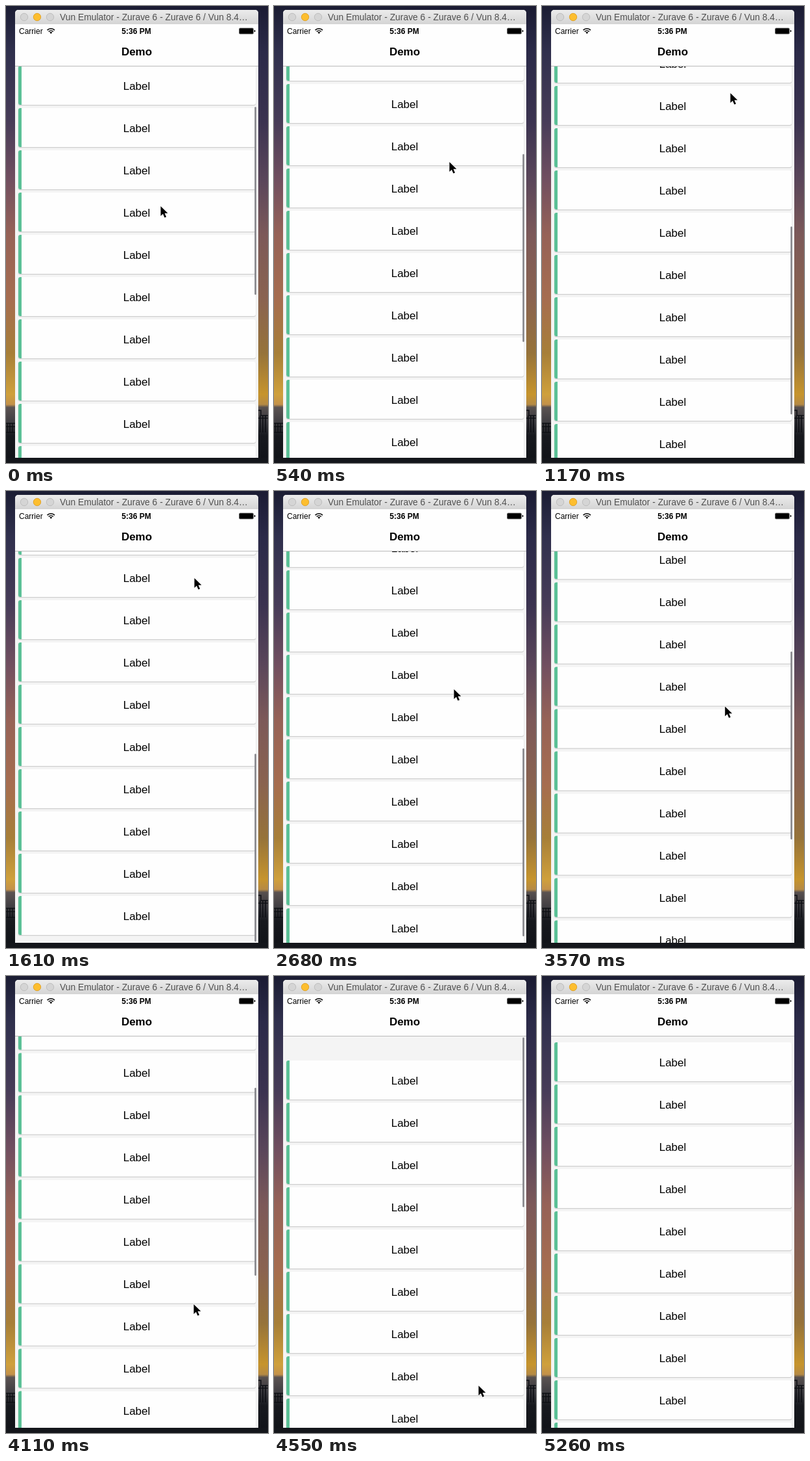
An HTML page for the animation above (6.07 s loop, 404x703 px).

```html
<!DOCTYPE html>
<html lang="en">
<head>
<meta charset="utf-8">
<title>List scrolling demo</title>
<style>
  html, body { margin: 0; width: 100%; height: 100%; overflow: hidden; background: #16171d; }
  svg { display: block; width: 100vw; height: 100vh; }
  text { font-family: "Liberation Sans", Arial, Helvetica, sans-serif; }
</style>
</head>
<body>
<svg viewBox="0 0 404 703" xmlns="http://www.w3.org/2000/svg">
  <defs>
    <linearGradient id="skyLeft" x1="0" y1="0" x2="0" y2="1">
      <stop offset="0" stop-color="#1b1d33"/>
      <stop offset=".1" stop-color="#30304d"/>
      <stop offset=".25" stop-color="#473c58"/>
      <stop offset=".38" stop-color="#714f60"/>
      <stop offset=".5" stop-color="#966257"/>
      <stop offset=".64" stop-color="#a66d50"/>
      <stop offset=".76" stop-color="#a77f38"/>
      <stop offset=".85" stop-color="#cfa03c"/>
      <stop offset=".872" stop-color="#c3914b"/>
      <stop offset=".878" stop-color="#5b5352"/>
      <stop offset=".91" stop-color="#413f43"/>
      <stop offset=".94" stop-color="#17191e"/>
      <stop offset="1" stop-color="#111318"/>
    </linearGradient>
    <linearGradient id="skyRight" x1="0" y1="0" x2="0" y2="1">
      <stop offset="0" stop-color="#1b1c33"/>
      <stop offset=".1" stop-color="#2b2a48"/>
      <stop offset=".25" stop-color="#3b3350"/>
      <stop offset=".38" stop-color="#5a465a"/>
      <stop offset=".5" stop-color="#7c5959"/>
      <stop offset=".64" stop-color="#8a6350"/>
      <stop offset=".76" stop-color="#96733a"/>
      <stop offset=".85" stop-color="#c6942d"/>
      <stop offset=".872" stop-color="#b58a45"/>
      <stop offset=".878" stop-color="#57504f"/>
      <stop offset=".91" stop-color="#38383d"/>
      <stop offset=".94" stop-color="#17191e"/>
      <stop offset="1" stop-color="#111318"/>
    </linearGradient>
    <linearGradient id="bar" x1="0" y1="0" x2="0" y2="1">
      <stop offset="0" stop-color="#ececec"/>
      <stop offset="1" stop-color="#d4d4d4"/>
    </linearGradient>
    <clipPath id="view"><rect x="14" y="93" width="375" height="602"/></clipPath>
    <g id="row">
      <rect x="18.5" y=".3" width="367" height="61.2" rx="3.5" fill="#e3e3e3"/>
      <rect x="19" y="1" width="366" height="60" rx="3" fill="#cfcfcf"/>
      <rect x="19" width="366" height="60" rx="3" fill="#fefefe"/>
      <path d="M24 0H22a3 3 0 0 0-3 3v54a3 3 0 0 0 3 3h2z" fill="#5bc096"/>
      <text x="201.5" y="36.6" font-size="17" text-anchor="middle">Label</text>
    </g>
  </defs>

  <rect width="202" height="703" fill="url(#skyLeft)"/>
  <rect x="202" width="202" height="703" fill="url(#skyRight)"/>
  <rect y="695" width="404" height="8" fill="#14161b"/>
  <path d="M0 642H14M0 647H14M2 642V656M6 642V656M10 642V656M0 656H14" stroke="#0e1014" stroke-width="1.3"/>
  <path d="M389 622l4 0v8h11M389 634H404M392 630V656M396 630V656M400 630V656" fill="none" stroke="#0e1014" stroke-width="1.6"/>

  <path d="M14 695V11a5 5 0 0 1 5-5H384a5 5 0 0 1 5 5V695z" fill="#f4f4f4"/>
  <g clip-path="url(#view)">
    <g id="list"></g>
    <rect id="thumb" x="383.3" width="2.6" rx="1.3" fill="#85858a"/>
  </g>

  <path d="M14 28V11a5 5 0 0 1 5-5H384a5 5 0 0 1 5 5V28z" fill="url(#bar)"/>
  <g stroke-width="1">
    <circle cx="28" cy="17" r="5.7" fill="#d5d5d5" stroke="#bebebe"/>
    <circle cx="48" cy="17" r="5.7" fill="#fdbe2f" stroke="#e0a42b"/>
    <circle cx="68" cy="17" r="5.7" fill="#d5d5d5" stroke="#bebebe"/>
  </g>
  <text x="83" y="22" font-size="13.85" fill="#505050">Vun Emulator - Zurave 6 - Zurave 6 / Vun 8.4…</text>

  <rect x="14" y="28" width="375" height="64" fill="#fefefe"/>
  <rect x="14" y="92" width="375" height="1" fill="#b9b9b9"/>
  <text x="20" y="42.6" font-size="12">Carrier</text>
  <g fill="none" stroke="#000" stroke-width="1.6">
    <path d="M63.6 37.1a8 8 0 0 1 11.4 0M65.8 39.4a5 5 0 0 1 7 0"/>
    <path d="M69.3 42.8l-2-2a2.9 2.9 0 0 1 4 0z" fill="#000" stroke="none"/>
  </g>
  <text x="201" y="42.6" font-size="12" font-weight="700" text-anchor="middle">5:36 PM</text>
  <rect x="359.5" y="34" width="22" height="9" rx="1.5" fill="#000" stroke="#777" stroke-width=".8"/>
  <path d="M382.7 36.7a1.8 1.8 0 0 1 0 3.6z"/>
  <text x="201.5" y="76" font-size="17" font-weight="700" text-anchor="middle">Demo</text>

  <path id="pointer" d="M0 0V15l3.5-3.3 2.5 5.8 2.6-1.1-2.5-5.6h4.9z" fill="#000" stroke="#fff" stroke-width="1.1" paint-order="stroke"/>
</svg>
<script>
const LOOP = 6070, STEP = 89.26, LAST = 67;
const ROWS = 20, PITCH = 65, TOP = 102;
const $ = id => document.getElementById(id);

const ease = {
  linear: u => u,
  in: u => u * u,
  out: u => 1 - (1 - u) * (1 - u),
  both: u => u * u * (3 - 2 * u)
};

// Keys: step, value, easing of the stretch that ends there
const scrollKeys = [
  [0, 140], [7, 310.5, 'out'], [8, 310.5], [11, 420, 'in'], [18, 714, 'out'],
  [29, 714], [30, 695], [32, 590], [36, 505, 'out'], [37, 505],
  [43, 198, 'both'], [44, 198], [46, 178.5, 'in'], [49, 63],
  [51, -28, 'out'], [56, 0, 'both']
];
const xKeys = [
  [0, 238.5], [3, 270.5, 'out'], [8, 270.5], [12, 290.5], [25, 290.5],
  [30, 277.5], [32, 279], [36, 274.5], [43, 288], [44, 288],
  [46, 289.5], [49, 308], [58, 367, 'both']
];
const yKeys = [
  [0, 308], [3, 240, 'out'], [8, 240], [11, 140, 'in'], [12, 134], [25, 134],
  [29, 286, 'both'], [30, 305], [32, 410], [36, 163, 'both'], [37, 178],
  [43, 485, 'both'], [44, 485], [46, 505, 'in'], [49, 620], [58, 701, 'both'], [59, 712]
];
const fadeKeys = [[0, 1], [54, 1], [58, 0]];

function at(keys, step) {
  const i = keys.findIndex(k => k[0] >= step);
  if (i < 0) return keys[keys.length - 1][1];
  if (i === 0) return keys[0][1];
  const [s0, v0] = keys[i - 1], [s1, v1, kind = 'linear'] = keys[i];
  return v0 + (v1 - v0) * ease[kind]((step - s0) / (s1 - s0));
}

for (let i = 0; i < ROWS; i++) {
  const row = document.createElementNS('http://www.w3.org/2000/svg', 'use');
  row.setAttribute('href', '#row');
  row.setAttribute('y', TOP + i * PITCH);
  $('list').append(row);
}

function draw(time) {
  const step = Math.min(LAST, Math.floor((time + 8) / STEP));
  const offset = at(scrollKeys, step);
  $('list').setAttribute('transform', `translate(0 ${-offset})`);
  $('thumb').setAttribute('y', 94.5 + Math.max(0, offset) / 2.305);
  $('thumb').setAttribute('height', 289 + Math.min(0, offset));
  $('thumb').setAttribute('opacity', at(fadeKeys, step));
  $('pointer').setAttribute('transform', `translate(${at(xKeys, step)} ${at(yKeys, step)})`);
}

const start = performance.now();
function tick() {
  draw((performance.now() - start) % LOOP);
  requestAnimationFrame(tick);
}
tick();
</script>
</body>
</html>
```
